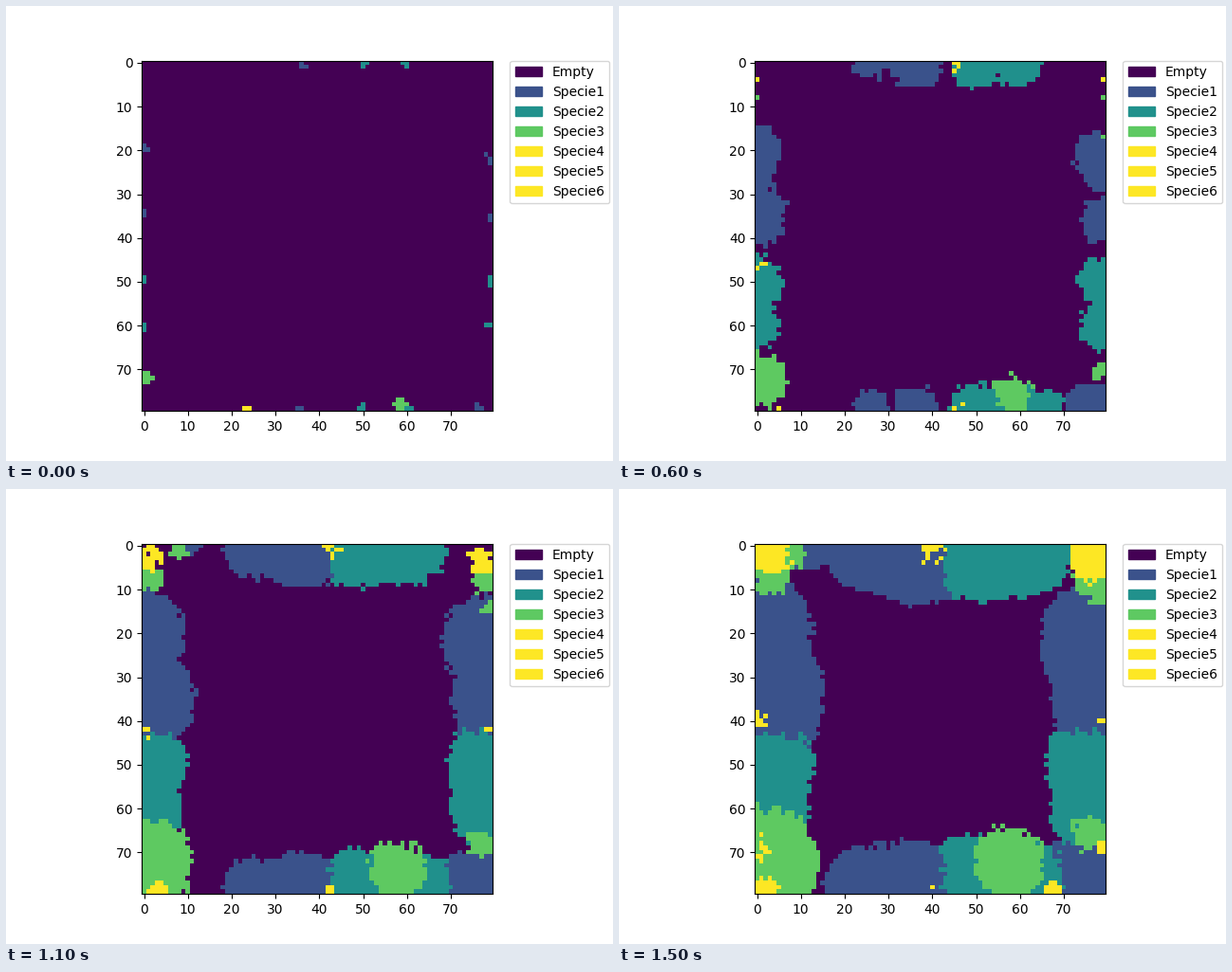
A matplotlib script for the animation above (1.6 s loop, 640 by 480 pixels).

```python
import numpy as np
import matplotlib.pyplot as plt
from matplotlib.animation import FuncAnimation
from matplotlib.patches import Patch

SIZE = 80
FRAMES = 16
LAST = FRAMES - 1
LABELS = ["Empty"] + [f"Specie{i}" for i in range(1, 7)]
BLUE, TEAL, GREEN, YELLOW = 1, 2, 3, 4
WALLS = ("top", "left", "right", "bottom")

rng = np.random.default_rng(7)
yy, xx = np.mgrid[:SIZE, :SIZE]


def noise(amount):
    """Fixed roughness, one value per cell."""
    return np.clip(rng.normal(0, amount, (SIZE, SIZE)), -2 * amount, 2 * amount)


def on_wall(wall, along, depth=0):
    far = SIZE - 1 - depth
    return {"top": (along, depth), "bottom": (along, far),
            "left": (depth, along), "right": (far, along)}[wall]


def distance(x, y):
    return (np.abs(xx - x) ** 2.3 + np.abs(yy - y) ** 2.3) ** (1 / 2.3)


# Settlers take empty cells: keep the time each cell is first reached
reached = {s: np.full((SIZE, SIZE), np.inf) for s in (BLUE, TEAL)}
seam = noise(1)
rough = noise(.55)


def settle(species, wall, along, birth=0, pace=.8):
    x, y = on_wall(wall, along)
    when = birth - 1.2 + distance(x, y) / pace + noise(.55)
    reached[species] = np.minimum(reached[species], when)


for wall in WALLS:
    settle(BLUE, wall, 26, birth=2, pace=.75)
    settle(TEAL, wall, 50)
    settle(TEAL, wall, 60, pace=.74)
settle(BLUE, "top", 36, pace=.83)
settle(BLUE, "left", 20, pace=.77)
settle(BLUE, "left", 35, pace=.94)
settle(BLUE, "right", 22, pace=.88)
settle(BLUE, "right", 36, pace=.72)
settle(BLUE, "bottom", 36, pace=.72)
settle(BLUE, "bottom", 76)
settle(TEAL, "bottom", 67, birth=3)
settle(BLUE, "top", 11, birth=10, pace=.9)
settle(BLUE, "left", 10, birth=10, pace=.6)

# Invaders take any cell: round patches that drift and grow
invaders = []


def invade(species, birth, start, end, r0, r1, density=1, until=LAST):
    invaders.append((species, birth, until, np.array([*start, r0]),
                     np.array([*end, r1]), density))


invade(GREEN, 0, (.7, 72), (1, 73), 1.3, 13)
invade(GREEN, 0, (58.5, 78), (57.5, 72.5), 1.6, 8)
invade(GREEN, 3, (79, 72), (75.5, 66), 1, 3.8)
invade(GREEN, 6, (0, 8), (3, 7), .8, 4)
invade(GREEN, 7, (8, 0), (8, 2.5), .8, 3)
invade(GREEN, 6, (79, 8), (76.5, 8), .8, 4.2)
invade(GREEN, 6, (79, 17), (78, 12), 1, 2, density=.7)

invade(YELLOW, 6, (0, 4), (3, 2), .8, 4.6, density=.92)
invade(YELLOW, 6, (79, 4), (76.5, 3), .8, 5, density=.92)
invade(YELLOW, 6, (5, 79), (2, 79), .8, 3.6)
invade(YELLOW, 0, (24, 79.5), (29, 79.5), 1.2, .8, until=4)
invade(YELLOW, 13, (0, 66), (0, 69), 1, 3, density=.5)
invade(YELLOW, 13, (79, 67.5), (79, 69), .8, 1.4)
invade(YELLOW, 13, (67, 79), (68, 79), .8, 2)
for wall, reach in zip(WALLS, (3.3, 1.8, 1, .8)):
    invade(YELLOW, 3, on_wall(wall, 48, .5), on_wall(wall, 40, reach / 2),
           1.2, reach, density=.6)


def state(t):
    grid = np.zeros((SIZE, SIZE))
    blue, teal = reached[BLUE], reached[TEAL]
    grid[blue <= t] = BLUE
    grid[(teal <= t) & ((teal + seam < blue) | (blue > t))] = TEAL
    dice = np.random.default_rng(t)
    for species, birth, until, start, end, density in invaders:
        if birth <= t <= until:
            x, y, r = start + (end - start) * (t - birth) / (until - birth)
            inside = distance(x, y) + rough * min(1, r / 4) < r
            grid[inside & (dice.random(grid.shape) < density)] = species
    return grid


fig, ax = plt.subplots(figsize=(6.4, 4.8), dpi=100)
image = ax.imshow(state(0), cmap="viridis", vmin=0, vmax=YELLOW,
                  interpolation="nearest")
patches = [Patch(color=image.cmap(image.norm(i)), label=name)
           for i, name in enumerate(LABELS)]
ax.legend(handles=patches, bbox_to_anchor=(1.05, 1), loc="upper left",
          borderaxespad=0)


def update(t):
    image.set_data(state(t))
    return [image]


anim = FuncAnimation(fig, update, frames=FRAMES, interval=100, repeat=True)
plt.show()
```
